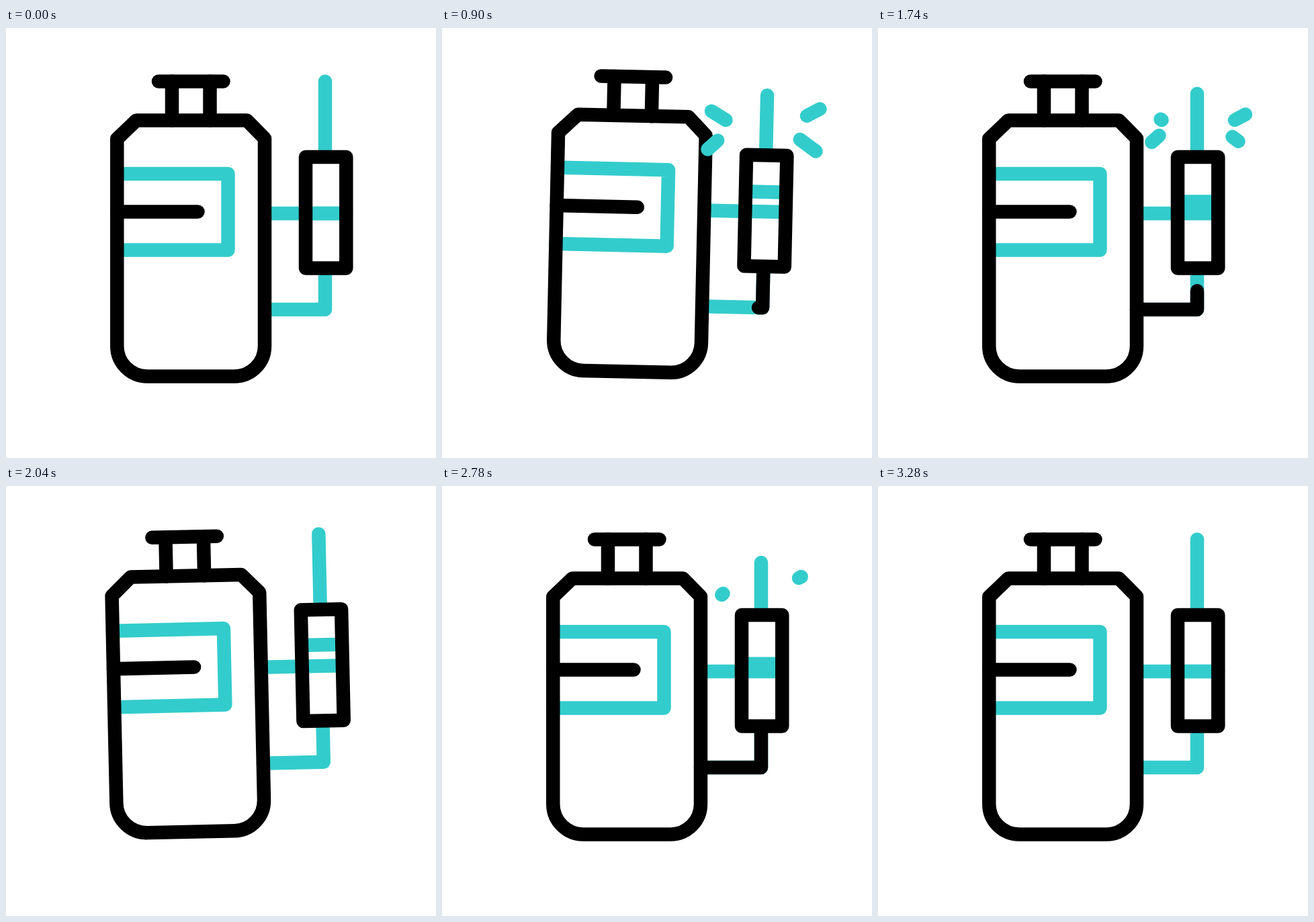
An HTML page with a canvas that plays this animation: 640x640 px, repeating every 3300 ms.

```html
<!DOCTYPE html>
<html lang="en">
<head>
<meta charset="utf-8">
<title>Pump sprayer</title>
<style>
  html, body { margin: 0; width: 100%; height: 100%; overflow: hidden; background: #fff; }
  canvas { display: block; width: 640px; height: 640px; }
</style>
</head>
<body>
<canvas id="stage" width="640" height="640"></canvas>
<script>
const ctx = document.getElementById('stage').getContext('2d');
const TEAL = '#33cccc', BLACK = '#000';
const LOOP = 3300, HOLD = 300, STEP = 20;
const CYCLE = 50, STROKE = 17;
const BURSTS = [27, 73, 127];

// inner point, outer point, delay
const DROPS = [
  [531, 137, 562.5, 120.5, -2.6],
  [418.5, 160, 395.5, 180.5, -2.5],
  [527.5, 162, 556.5, 183.5, -1.6],
  [422.5, 137, 397.5, 121.5, -.4]
];
const DROP_RATE = .195, DROP_GAP = 4.65;

const clamp = v => Math.max(0, Math.min(1, v));
const smooth = v => .5 - .5 * Math.cos(Math.PI * clamp(v));
const mix = (a, b, k) => a + (b - a) * k;

function line(color, ...p) {
  ctx.strokeStyle = color;
  ctx.beginPath();
  for (let i = 0; i < p.length; i += 2) ctx.lineTo(p[i], p[i + 1]);
  ctx.stroke();
}

// two even pump strokes, a pause, then a quick one
function strokeAt(n) {
  const p = n % CYCLE;
  return p < 2 * STROKE ? p % STROKE / STROKE : clamp((p - 40.7) / 9.3);
}

// the rod sinks slowly, then springs back
function rodDrop(f) {
  const peak = .64;
  return 68 * (f < peak ? Math.pow(f / peak, 2.2) : Math.pow((1 - f) / (1 - peak), 1.5));
}

const pistonRise = x => 38 * smooth((x + 9) / 19) * smooth((23 - x) / 11);

const hop = x => 10.5 * Math.sin(Math.PI * clamp(x / 17));

function tilt(x) {
  const a = Math.PI * clamp(x / 18);
  return 1.38 * Math.sin(2 * a) - .25 * Math.sin(a) ** 2;
}

function fluid(f) {
  const bend = 90, total = 151;
  const head = total * clamp(f / .453);
  const tail = total * Math.pow(clamp(2 * f - 1), 1.35);
  if (head <= tail) return;
  const at = d => [385 + Math.min(d, bend), 419 - Math.max(0, d - bend)];
  const corner = tail < bend && head > bend ? at(bend) : [];
  line(BLACK, ...at(tail), ...corner, ...at(head));
}

function body() {
  ctx.strokeStyle = BLACK;
  ctx.beginPath();
  ctx.moveTo(165.3, 165);
  ctx.lineTo(194, 137.5);
  ctx.lineTo(358.5, 137.5);
  ctx.lineTo(385, 164.5);
  ctx.arcTo(385, 518.5, 340, 518.5, 45);
  ctx.arcTo(165.3, 518.5, 165.3, 473, 45);
  ctx.closePath();
  ctx.stroke();
  line(BLACK, 227, 79.5, 323.5, 79.5);
  for (const x of [247, 303.5]) line(BLACK, x, 79.5, x, 137.5);
  line(BLACK, 165.3, 273.5, 285.5, 273.5);
}

function drops(x) {
  for (const [x0, y0, x1, y1, delay] of DROPS) {
    const end = clamp((x - delay) * DROP_RATE);
    const start = clamp((x - delay - DROP_GAP) * DROP_RATE);
    if (end <= start) continue;
    const at = k => [mix(x0, x1, k), mix(y0, y1, k)];
    line(TEAL, ...at(start), ...at(end));
  }
}

function draw(n) {
  const x = n - BURSTS.find(b => n <= b + 23);
  const f = strokeAt(n);
  const piston = 276 - pistonRise(x);

  ctx.fillStyle = '#fff';
  ctx.fillRect(0, 0, 640, 640);
  ctx.lineWidth = 20.5;
  ctx.lineCap = ctx.lineJoin = 'round';

  ctx.save();
  ctx.translate(275, 518 - hop(x));
  ctx.rotate(tilt(x) * Math.PI / 180);
  ctx.translate(-275, -518);

  line(TEAL, 165.3, 217, 330.5, 217, 330.5, 330.5, 165.3, 330.5);
  line(TEAL, 385, 276, 506, 276);
  line(TEAL, 446, piston, 506, piston);
  line(TEAL, 475, 79.5 + rodDrop(f), 475, 191);
  line(TEAL, 385, 419, 475, 419, 475, 358);
  fluid(f);
  ctx.strokeStyle = BLACK;
  ctx.strokeRect(446, 192, 60.3, 165.5);
  body();
  ctx.restore();

  drops(x);
}

const begin = performance.now();
function tick() {
  const t = Math.max(0, performance.now() - begin) % LOOP;
  draw(t < HOLD ? 0 : Math.floor((t - HOLD) / STEP) + 1);
  requestAnimationFrame(tick);
}
tick();
</script>
</body>
</html>
```
